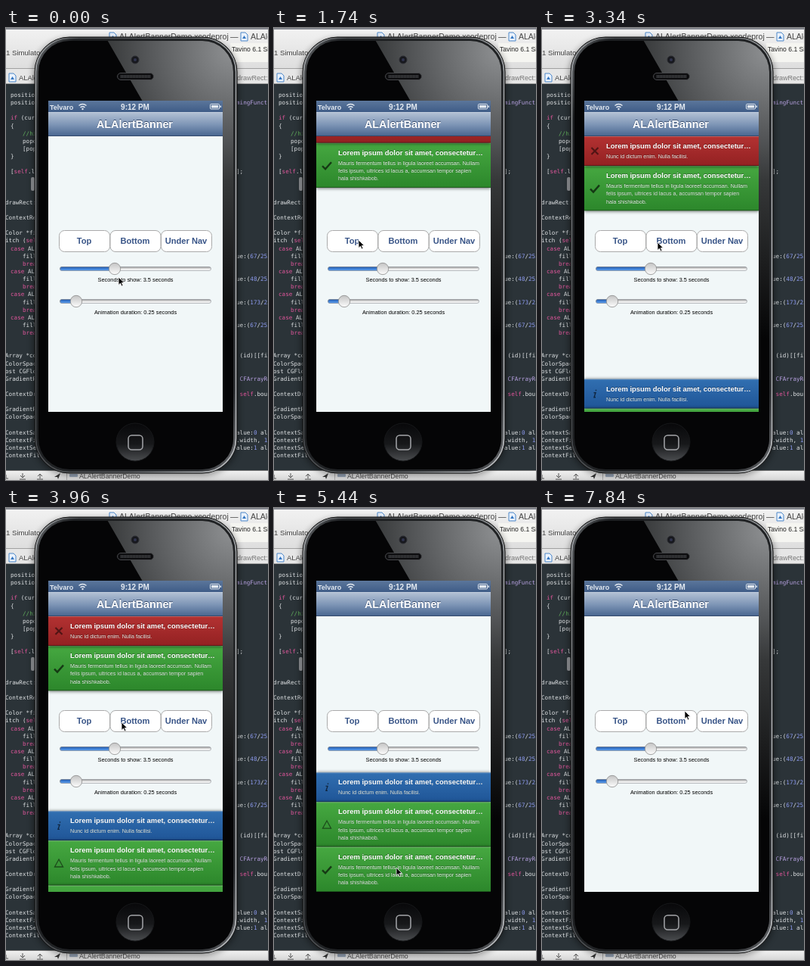
Recreate the animation shown at these times as an HTML page. Size 347 px wide and 597 px high, loop 7.92 s.

```html
<!DOCTYPE html>
<html lang="en">
<head>
<meta charset="utf-8">
<title>ALAlertBanner demo</title>
<style>
  html, body { margin: 0; width: 100%; height: 100%; overflow: hidden; background: #2b3338; }
  svg { display: block; width: 347px; height: 597px; }
  text { font-family: "Liberation Sans", Arial, sans-serif; white-space: pre; }
  .code text { font: 7.6px "DejaVu Sans Mono", monospace; fill: #dfe2e4; }
  .bold { font-weight: bold; }
  .mid { text-anchor: middle; }
</style>
</head>
<body>
<svg viewBox="0 0 347 597" xmlns="http://www.w3.org/2000/svg">
  <defs>
    <linearGradient id="chrome" x2="0" y2="1"><stop stop-color="#f2f2f2"/><stop offset="1" stop-color="#d6d6d6"/></linearGradient>
    <linearGradient id="steel" x2="1" y2="1"><stop stop-color="#6a6d70"/><stop offset=".1" stop-color="#1c1e20"/><stop offset=".5" stop-color="#1f2123"/><stop offset=".9" stop-color="#2a2c2f"/><stop offset="1" stop-color="#77797c"/></linearGradient>
    <linearGradient id="rim" x2="1" y2=".3"><stop stop-color="#a9acaf"/><stop offset=".2" stop-color="#45484b"/><stop offset=".7" stop-color="#606366"/><stop offset="1" stop-color="#b4b7ba"/></linearGradient>
    <radialGradient id="glare" gradientUnits="userSpaceOnUse" cx="300" cy="30" r="380"><stop stop-color="#8e9092"/><stop offset=".3" stop-color="#545658"/><stop offset=".45" stop-color="#363839"/><stop offset="1" stop-color="#050506"/></radialGradient>
    <linearGradient id="status" x2="0" y2="1"><stop stop-color="#5b769b"/><stop offset="1" stop-color="#3f5c87"/></linearGradient>
    <linearGradient id="nav" x2="0" y2="1"><stop stop-color="#b4c2d5"/><stop offset=".5" stop-color="#8097b7"/><stop offset="1" stop-color="#48658f"/></linearGradient>
    <linearGradient id="pressed" x2="0" y2="1"><stop stop-color="#1a94f8"/><stop offset="1" stop-color="#0260e8"/></linearGradient>
    <linearGradient id="track" x2="0" y2="1"><stop stop-color="#8d8d8d"/><stop offset=".5" stop-color="#e6e6e6"/><stop offset="1" stop-color="#fff"/></linearGradient>
    <linearGradient id="fill" x2="0" y2="1"><stop stop-color="#1f58ad"/><stop offset="1" stop-color="#5fa4f6"/></linearGradient>
    <linearGradient id="thumb" x2="0" y2="1"><stop stop-color="#c4c4c4"/><stop offset="1" stop-color="#fdfdfd"/></linearGradient>
    <linearGradient id="home" x2="0" y2="1"><stop stop-color="#08080a"/><stop offset=".55" stop-color="#17181a"/><stop offset="1" stop-color="#4b4d50"/></linearGradient>
    <linearGradient id="green" x2="0" y2="1"><stop stop-color="#46a841"/><stop offset="1" stop-color="#2c872b"/></linearGradient>
    <linearGradient id="red" x2="0" y2="1"><stop stop-color="#b33232"/><stop offset="1" stop-color="#932122"/></linearGradient>
    <linearGradient id="blue" x2="0" y2="1"><stop stop-color="#316fb1"/><stop offset="1" stop-color="#1f5597"/></linearGradient>
    <filter id="soft" x="-20%" y="-20%" width="140%" height="140%"><feGaussianBlur stdDeviation="4"/></filter>
    <filter id="near" x="-10%" y="-20%" width="120%" height="150%"><feGaussianBlur stdDeviation="2"/></filter>
    <clipPath id="face"><rect x="43" y="17" width="258" height="566" rx="41"/></clipPath>
    <clipPath id="page"><rect x="56" y="143" width="231" height="364"/></clipPath>
  </defs>

  <rect width="347" height="597" fill="#2b3338"/>
  <g id="code" class="code"></g>

  <g fill="#444">
    <rect width="347" height="74" fill="url(#chrome)"/>
    <rect width="347" height="2" fill="#85888f"/>
    <path d="M0 53.5H347M0 73.5H347" stroke="#a0a0a0"/>
    <rect y="54" width="347" height="19" fill="#e6e6e6"/>
    <rect x="297" y="20" width="51" height="25" fill="#f5f5f1"/>
    <g id="docs"></g>
    <text x="150" y="15" font-size="10.5">ALAlertBannerDemo.xcodeproj</text>
    <text x="297" y="15" font-size="10.5">—</text>
    <text x="324" y="15" font-size="10.5">ALAlertBanner</text>
    <text x="299" y="31" font-size="8.6" fill="#222">Tavino 6.1 Simulator</text>
    <text x="0" y="36" font-size="9.6">1 Simulator</text>
    <text x="17" y="69" font-size="9.4">ALAlertBanner</text>
    <text x="306" y="69" font-size="9" fill="#777">drawRect:</text>
  </g>

  <g>
    <rect y="584" width="347" height="13" fill="url(#chrome)"/>
    <path d="M0 584.5H347" stroke="#777"/>
    <path d="M22 588v6m-3-3 3 3 3-3M18 596h8M45 595v-6m-3 3 3-3 3 3M41 596h8M0 590v5h3" fill="none" stroke="#555"/>
    <path d="M64 593l8-5-3 8-1-3z" fill="#333"/>
    <path d="M80.500 586v11" stroke="#aaa"/>
    <rect x="84" y="589" width="11" height="4" rx="1" fill="#95a3b5"/>
    <text x="97" y="595" font-size="8.8" fill="#444">ALAlertBannerDemo</text>
  </g>

  <g>
    <rect x="36" y="14" width="272" height="577" rx="48" opacity=".4" filter="url(#soft)"/>
    <rect x="33" y="197" width="5" height="18" rx="2" fill="#7b7d80"/>
    <rect x="38" y="12" width="268" height="576" rx="46" fill="url(#steel)" stroke="#111"/>
    <rect x="39.500" y="13.500" width="265" height="573" rx="44.500" fill="none" stroke="url(#rim)" stroke-width="1.500"/>
    <g clip-path="url(#face)">
      <rect x="43" y="17" width="258" height="566" fill="#050506"/>
      <path d="M133 14H306V588H287V400L181 97Z" fill="url(#glare)"/>
    </g>
    <circle cx="171" cy="42" r="5" fill="#17181d" stroke="#2c2d32"/>
    <circle cx="171" cy="42" r="2" fill="#30344d"/>
    <rect x="147.500" y="59.500" width="48" height="9" rx="4.500" fill="#0d0d0f" stroke="#48494c"/>
    <path d="M152 64H192" stroke="#4c4e51" stroke-width="4" stroke-dasharray="1 1"/>
    <circle cx="171" cy="547" r="25" fill="url(#home)" stroke="#161719"/>
    <rect x="162" y="538" width="19" height="19" rx="4.500" fill="none" stroke="#a5a7aa" stroke-width="1.500"/>
  </g>

  <rect x="56" y="96" width="231" height="411" fill="#f1f7f8"/>
  <g id="controls"></g>
  <g id="banners" clip-path="url(#page)"></g>

  <g fill="#fff">
    <rect x="56" y="96" width="231" height="15" fill="url(#status)"/>
    <rect x="56" y="111" width="231" height="32" fill="url(#nav)"/>
    <path d="M56 111.500H287" stroke="#c9d4e2" opacity=".7"/>
    <path d="M56 142.500H287" stroke="#33496c"/>
    <g fill="#e4eaf1">
      <text class="bold" x="58" y="107.500" font-size="9">Telvaro</text>
      <path d="M96.500 102.500q5-4 10 0M98.500 105q3-2.500 6 0" fill="none" stroke="#e4eaf1" stroke-width="1.500"/>
      <circle cx="101.500" cy="107" r="1.200"/>
      <text class="bold mid" x="171" y="107.500" font-size="10">9:12 PM</text>
      <rect x="270.500" y="100.500" width="12" height="6.500" rx="1" fill="none" stroke="#e4eaf1"/>
      <path d="M272 102h9v3.500h-9zM283.500 102.500h1.500v2.500h-1.500z"/>
    </g>
    <text class="bold mid" x="170.500" y="131" font-size="14.300" fill="#34496b">ALAlertBanner</text>
    <text class="bold mid" x="170.500" y="132" font-size="14.300">ALAlertBanner</text>
  </g>

  <circle id="ring" r="16.500" fill="none" stroke="#111" stroke-width="1.300"/>
  <path id="cursor" d="M0 0V10.500L2.500 8.200 4.200 12 6 11.200 4.300 7.500H7.600Z" fill="#000" stroke="#fff" stroke-width=".8"/>
</svg>

<script>
const LOOP = 7920, SLIDE = 250;
const PAGE = { left: 56, width: 231, top: 143, bottom: 507 };
const byId = id => document.getElementById(id);

function add(parent, tag, attrs, text) {
  const node = document.createElementNS("http://www.w3.org/2000/svg", tag);
  for (const key in attrs) node.setAttribute(key, attrs[key]);
  if (text) node.textContent = text;
  return parent.appendChild(node);
}

// Editor listing: rows share one pitch; an empty entry is a blank row.
const left = `  positionAnimation
  position.timing

  if (currentPos
  {
     //hide
     popover
     [popover
  }

  [self.layer



drawRect:

ContextRef

Color *fill
itch (self
  case AL
     fillCol
     break;
  case AL
     fillCol
     break;
  case AL
     fillCol
     break;
  case AL
     fillCol
     break;


Array *colors
ColorSpace
ost CGFloat
GradientRef

ContextDraw

GradientRel
ColorSpace

ContextSave
ContextFill
ContextSet
ContextFill`.split("\n");
const right = {
  1: "mingFunction", 10: "];", 21: "ue:(67/255.0", 24: "ue:(48/255.0", 27: "ue:(173/255.0", 30: "ue:(67/255.0",
  34: " (id)[[fill", 37: " CFArrayRef", 39: " self.bounds", 44: "alue:0 alpha", 45: ".width, 1.0", 46: "alue:1 alpha"
};
const INK = { word: "#e0569b", comment: "#63b35d", number: "#8d9bf0", type: "#b9a3e3" };

function codeLine(x, y, line) {
  const row = add(byId("code"), "text", { x, y });
  for (const part of line.match(/\/\/.*|\b(?:if|case|break|self)\b|\b\d+(?:\.\d+)?|mingFunction|CFArrayRef|./g)) {
    const kind = part.startsWith("//") ? "comment" : /^\d/.test(part) ? "number"
      : /^(if|case|break|self)$/.test(part) ? "word" : part.length > 1 ? "type" : "";
    add(row, "tspan", kind ? { fill: INK[kind] } : {}, part);
  }
}

left.forEach((line, i) => {
  const y = 91 + i * 10.13, body = line.trimStart(), indent = line.length - body.length;
  if (body) codeLine(indent === 0 ? -1 : indent === 2 ? 6 : 22, y, body);
  if (right[i]) codeLine(305, y, right[i]);
});

for (const [x, y] of [[137, 6], [311, 6], [4, 60]]) {
  add(byId("docs"), "path", { d: `M${x} ${y}h6l3 3v8h-9z`, fill: "#eaf2fc", stroke: "#4d87c8" });
  add(byId("docs"), "path", { d: `M${x + 2} ${y + 8}l2.500-4 2.500 4z`, fill: "#3476c2" });
}

const controls = byId("controls");
const buttons = [["Top", 70.5], ["Bottom", 138], ["Under Nav", 205.5]].map(([label, x]) => ({
  box: add(controls, "rect", { x, y: 267.5, width: 67, height: 28, rx: 7, stroke: "#aaa" }),
  text: add(controls, "text", { x: x + 33, y: 285.3, "font-size": 11.1, class: "bold mid" }, label)
}));

function slider(y, knob, label) {
  const bar = (width, fill) => add(controls, "rect", { x: 71.5, y: y - 2.5, width, height: 5, rx: 2.5, fill, stroke: "#8b8f96", "stroke-width": .6 });
  bar(200, "url(#track)");
  bar(knob - 71.5, "url(#fill)");
  add(controls, "circle", { cx: knob, cy: y, r: 7.7, fill: "url(#thumb)", stroke: "#8c8c8c", "stroke-width": .8 });
  add(controls, "text", { x: 171.5, y: y + 17.3, "font-size": 7.37, class: "mid" }, label);
}
slider(318, 144, "Seconds to show: 3.5 seconds");
slider(361, 93, "Animation duration: 0.25 seconds");

const SHORT = ["Nunc id dictum enim. Nulla facilisi."];
const LONG = [
  "Mauris fermentum tellus in ligula laoreet accumsan. Nullam",
  "felis ipsum, ultrices id lacus a, accumsan tempor sapien",
  "hala shishkabob."
];
// Path, line weight and opacity of each symbol
const ICONS = {
  check: ["M-6 1 -2 5 6-4", 2.4, .62],
  cross: ["M-4.500-4.500 4.500 4.500M4.500-4.500-4.500 4.500", 2.2, .5],
  info: ["M-1.500-1.500H1L-1 4.500H1M1.500-5.500v1.500", 1.4, .6],
  warn: ["M0-5 5.500 5H-5.500Z", 1.3, .5]
};

function makeBanner(side, color, icon, lines, show, hide) {
  const height = lines.length > 1 ? 59.3 : 39;
  const node = add(byId("banners"), "g", {});
  const { left: x, width } = PAGE;
  const [d, weight, opacity] = ICONS[icon];
  add(node, "rect", { x, y: 0, width, height: height + 1, opacity: .55, filter: "url(#near)" });
  add(node, "rect", { x, y: 0, width, height, fill: `url(#${color})` });
  add(node, "path", { d: `M${x} .5h${width}`, stroke: "#fff", opacity: .22 });
  add(node, "path", { d: `M${x} ${height - .5}h${width}`, stroke: "#000", opacity: .35 });
  add(node, "path", {
    d, transform: `translate(70 ${height / 2})`, fill: "none", stroke: "#000", opacity, "stroke-width": weight
  });
  const label = (y, size, text, cls, fill) => {
    add(node, "text", { x: 85, y: y - .6, "font-size": size, class: cls, fill: "#000", opacity: .35 }, text);
    add(node, "text", { x: 85, y, "font-size": size, class: cls, fill }, text);
  };
  label(16, 9.44, "Lorem ipsum dolor sit amet, consectetur…", "bold", "#fff");
  lines.forEach((line, i) => label(29 + i * 10.4, 7.15, line, "", "#e6eee8"));
  return { side, height, show, hide, node };
}

const banners = [
  makeBanner("top", "green", "check", LONG, 1390, 4930),
  makeBanner("top", "red", "cross", SHORT, 1665, 5165),
  makeBanner("bottom", "blue", "info", SHORT, 2720, 6220),
  makeBanner("bottom", "green", "warn", LONG, 3300, 6260),
  makeBanner("bottom", "green", "check", LONG, 3902, 5880)
];

// start, end, button index (-1 is a tap on a banner)
const presses = [
  [1290, 1390, 0], [1570, 1665, 0], [2600, 2720, 1], [3190, 3300, 1],
  [3790, 3902, 1], [5800, 5880, -1], [6160, 6260, -1]
];

// Pointer rests at each point until the next move: start, end, x, y
const moves = [
  [20, 360, 136, 308], [660, 720, 135, 306], [860, 1200, 112, 280],
  [2020, 2460, 153, 283], [4200, 5070, 162, 475], [6880, 7600, 190, 270], [7800, 7840, 189, 268]
];

function ease(start, duration, t) {
  const p = Math.max(0, Math.min(1, (t - start) / duration));
  return p * p * (3 - 2 * p);
}

function pointerAt(t) {
  let x = 149, y = 329;
  for (const [start, end, toX, toY] of moves) {
    const p = ease(start, end - start, t);
    x += (toX - x) * p;
    y += (toY - y) * p;
  }
  return [x, y];
}

function placeBanners(t) {
  const stacked = { top: 0, bottom: 0 };
  for (const b of [...banners].reverse()) {
    const gone = ease(b.hide, SLIDE, t);
    const shown = ease(b.show, SLIDE, t) - gone;
    const reach = stacked[b.side] + b.height * shown;
    const y = b.side === "top" ? PAGE.top + reach - b.height : PAGE.bottom - reach;
    b.node.setAttribute("transform", `translate(0 ${y.toFixed(2)})`);
    b.node.setAttribute("opacity", 1 - gone * .5);
    b.node.setAttribute("visibility", shown > 0 ? "visible" : "hidden");
    stacked[b.side] = reach;
  }
}

function render(t) {
  placeBanners(t);
  const press = presses.find(([start, end]) => t >= start && t < end);
  buttons.forEach(({ box, text }, i) => {
    const active = press && press[2] === i;
    box.setAttribute("fill", active ? "url(#pressed)" : "#fff");
    text.setAttribute("fill", active ? "#fff" : "#385487");
  });
  const place = `translate(${pointerAt(t).map(v => v.toFixed(2)).join(" ")})`;
  byId("cursor").setAttribute("transform", place);
  byId("ring").setAttribute("transform", place);
  byId("ring").setAttribute("visibility", press && t >= press[0] + 30 ? "visible" : "hidden");
}

const began = performance.now();
function tick() {
  render((performance.now() - began) % LOOP);
  requestAnimationFrame(tick);
}
tick();
</script>
</body>
</html>
```
